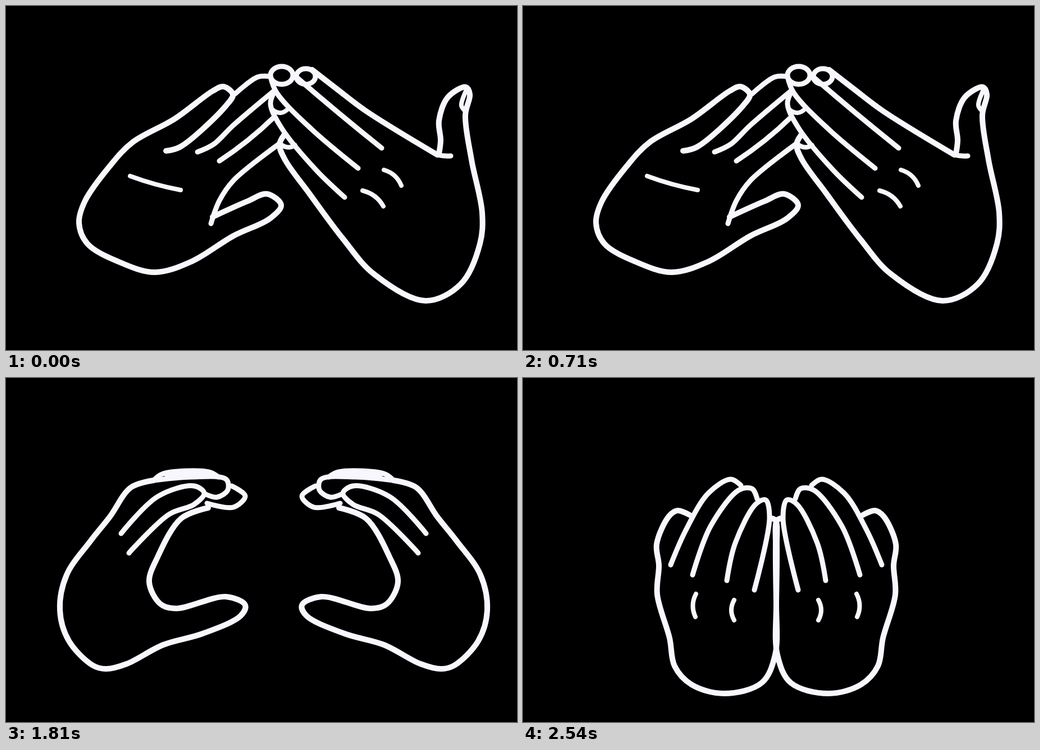
These frames come from a looping animation (910x615 px, 2900 ms). An HTML page with a canvas:

```html
<!DOCTYPE html>
<html lang="en">
<head>
<meta charset="utf-8">
<title>Hands</title>
<style>
html, body { margin: 0; width: 100%; height: 100%; overflow: hidden; background: #000; }
canvas { display: block; }
</style>
</head>
<body>
<canvas id="stage" width="910" height="615"></canvas>
<script>
const ctx = document.getElementById('stage').getContext('2d');
const OUTLINE = 10, FINGER = 9, CREASE = 8;

// Centripetal spline handle at b, pointing towards c, where a lies behind b
function handle(a, b, c) {
  const back = Math.sqrt(Math.hypot(b[0] - a[0], b[1] - a[1]));
  const ahead = Math.sqrt(Math.hypot(c[0] - b[0], c[1] - b[1]));
  if (!back) return b;
  const own = 2 * back * back + 3 * back * ahead + ahead * ahead;
  return b.map((v, k) =>
    (back * back * c[k] - ahead * ahead * a[k] + own * v) / (3 * back * (back + ahead)));
}

// Smooth stroke through a few key points
function curve(width, ...xy) {
  const last = xy.length / 2 - 1;
  const at = i => {
    const k = 2 * Math.max(0, Math.min(last, i));
    return [xy[k], xy[k + 1]];
  };
  ctx.lineWidth = width;
  ctx.beginPath();
  ctx.moveTo(...at(0));
  for (let i = 0; i < last; i++) {
    const from = at(i), to = at(i + 1);
    ctx.bezierCurveTo(...handle(at(i - 1), from, to), ...handle(at(i + 2), to, from), ...to);
  }
  ctx.stroke();
}

// Stroke between two points that bulges sideways at its middle
function bow(width, x0, y0, x1, y1, bulge) {
  const dx = x1 - x0, dy = y1 - y0, k = 2 * bulge / Math.hypot(dx, dy);
  ctx.lineWidth = width;
  ctx.beginPath();
  ctx.moveTo(x0, y0);
  ctx.quadraticCurveTo((x0 + x1) / 2 - dy * k, (y0 + y1) / 2 + dx * k, x1, y1);
  ctx.stroke();
}

function nail(x, y, rx, ry) {
  ctx.lineWidth = FINGER;
  ctx.beginPath();
  ctx.ellipse(x, y, rx, ry, 0, 0, 2 * Math.PI);
  ctx.stroke();
}

// Draws the shape flipped so that x becomes span - x
function flip(span, shape) {
  ctx.save();
  ctx.translate(span, 0);
  ctx.scale(-1, 1);
  shape();
  ctx.restore();
}

function pair(span, hand) {
  hand();
  flip(span, hand);
}

function openPalm() {
  curve(OUTLINE, 285,259, 310,252, 392,178, 404,158, 387,144, 368,152, 300,202, 225,244,
    185,286, 140,350, 130,388, 145,425, 200,457, 265,476, 330,457, 405,411, 470,380,
    490,356, 465,336, 430,349, 368,377);
  curve(FINGER, 365,389, 380,348, 405,312, 487,246);
  curve(FINGER, 408,157, 448,127, 470,126);
  curve(FINGER, 341,261, 370,247, 404,214, 477,152);
  bow(FINGER, 380,277, 477,199, 3);
  bow(CREASE, 221,304, 311,329, 2);
}

function handBack() {
  nail(491, 124, 20, 16);
  nail(534, 126, 17, 14);
  curve(FINGER, 471,126, 482,155, 545,221, 627,290);
  bow(FINGER, 517,127, 669,254, 1);
  curve(OUTLINE, 545,114, 590,149, 640,187, 768,266);
  bow(FINGER, 768,266, 792,268, 1);
  curve(OUTLINE, 771,264, 774,240, 771,205, 787,163, 819,145, 826,158, 818,195, 829,275,
    848,370, 844,425, 810,497, 747,527, 655,479, 600,416, 540,335, 497,275, 487,248, 495,231);
  curve(CREASE, 819,152, 811,178, 817,187);
  curve(FINGER, 478,153, 471,175, 490,217, 552,293, 603,342);
  bow(CREASE, 473,184, 504,182, 8);
  bow(CREASE, 488,246, 515,249, 5);
  bow(CREASE, 673,293, 704,321, -5);
  bow(CREASE, 635,330, 672,358, -5);
}

function touchingHand() {
  curve(OUTLINE, 268,273, 284,263, 342,172, 346,148, 328,137, 308,150, 235,254, 180,322,
    160,400, 175,464, 200,490, 268,517, 325,499, 375,475, 435,473, 484,437, 484,418,
    462,408, 405,415, 382,385, 390,325, 424,252);
  curve(FINGER, 350,142, 383,132, 406,143, 402,165, 348,204, 320,250);
  curve(FINGER, 410,143, 452,160, 461,178, 435,192, 410,185);
  curve(FINGER, 413,192, 388,208, 363,262);
  curve(FINGER, 463,177, 488,189, 465,213, 430,214);
  bow(FINGER, 449,216, 409,256, -6);
}

function curvedHand() {
  curve(OUTLINE, 263,183, 222,196, 185,248, 150,292, 108,352, 96,415, 112,470, 155,514,
    178,520, 215,511, 280,477, 350,457, 418,425, 426,406, 392,391, 303,412, 275,404,
    255,365, 270,320, 312,251, 360,232);
  curve(FINGER, 263,183, 280,171, 362,168, 378,177);
  bow(5, 285,176, 366,173, -3);
  curve(FINGER, 263,183, 330,177, 392,181, 395,200, 376,213, 356,208);
  curve(FINGER, 205,278, 270,212, 335,193, 353,206, 335,226, 290,244, 219,313);
  curve(FINGER, 402,193, 426,211, 405,231, 358,224);
}

function cuppedHand() {
  curve(OUTLINE, 297,245, 275,237, 260,247, 238,297, 242,335, 239,387, 261,465, 270,515,
    300,548, 358,564, 425,545, 449,495, 451,400, 452,300, 450,255, 443,251);
  curve(FINGER, 263,334, 290,272, 330,206, 370,181, 388,192);
  curve(FINGER, 302,352, 334,265, 385,200, 408,198, 417,216);
  curve(FINGER, 363,362, 378,295, 415,225, 432,218, 439,250, 412,379);
  bow(CREASE, 308,386, 307,427, 5);
  bow(CREASE, 376,397, 376,433, 5);
}

function roof() {
  openPalm();
  handBack();
}

function partedHand() {
  ctx.save();
  ctx.translate(-65, -6);
  cuppedHand();
  ctx.restore();
}

const mirroredRoof = () => flip(978, roof);
const touching = () => pair(977, touchingHand);
const curved = () => pair(953, curvedHand);
const parted = () => pair(902, partedHand);
const cupped = () => pair(902, cuppedHand);

const poses = [roof, mirroredRoof, roof, mirroredRoof, touching, curved, parted, cupped];
const ends = [360, 710, 1070, 1440, 1810, 2170, 2540, 2900];
const LOOP = 2900;

function frame() {
  const t = performance.now() % LOOP;
  ctx.fillStyle = '#000';
  ctx.fillRect(0, 0, 910, 615);
  ctx.strokeStyle = '#f8f7fd';
  ctx.lineCap = ctx.lineJoin = 'round';
  poses[ends.findIndex(end => t < end)]();
  requestAnimationFrame(frame);
}
frame();
</script>
</body>
</html>
```
